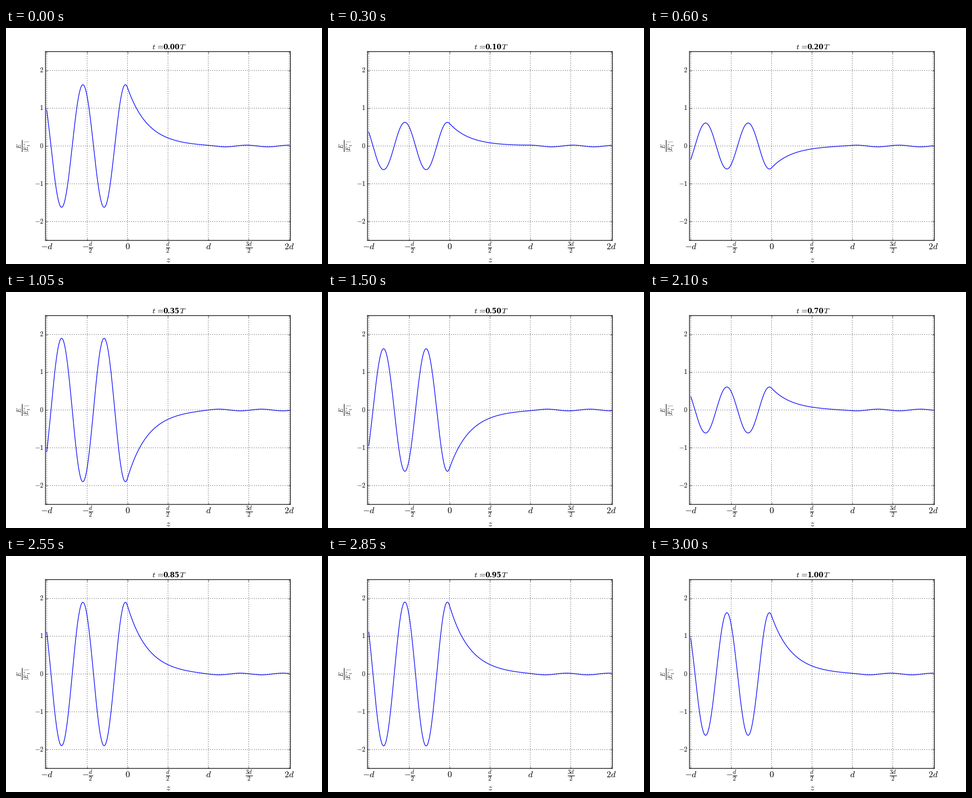
These frames come from a looping animation (576 px wide and 432 px high, 3150 ms). A matplotlib script:

```python
import numpy as np
import matplotlib.pyplot as plt
from matplotlib.animation import FuncAnimation

plt.style.use("classic")
plt.rcParams.update({
    "figure.facecolor": "white",
    "savefig.facecolor": "white",
    "savefig.dpi": "figure",
    "mathtext.fontset": "cm",
    "path.snap": False,
    "axes.linewidth": 1.2,
})

W, H, DPI = 576, 432, 72
FRAMES, INTERVAL = 21, 150

# Lengths are in units of the gap width d.
K = 2 * np.pi * 1.9      # wave number outside the gap
KAPPA = 0.33 * K         # decay constant inside the gap
PHASE = 0.2 * np.pi      # phase of the transmitted wave at z = d
MARGIN = 0.0156


def field(z):
    """Complex field of a wave tunnelling through the gap 0 < z < d."""
    out = np.exp(1j * PHASE)
    decay = out * (1 - 1j * K / KAPPA) / 2
    grow = out * (1 + 1j * K / KAPPA) / 2

    e0 = decay * np.exp(KAPPA) + grow * np.exp(-KAPPA)
    slope = KAPPA * (grow * np.exp(-KAPPA) - decay * np.exp(KAPPA))
    fwd = (e0 + slope / (1j * K)) / 2
    back = (e0 - slope / (1j * K)) / 2

    before = fwd * np.exp(1j * K * z) + back * np.exp(-1j * K * z)
    gap = decay * np.exp(-KAPPA * (z - 1)) + grow * np.exp(KAPPA * (z - 1))
    after = out * np.exp(1j * K * (z - 1))
    return np.where(z < 0, before, np.where(z < 1, gap, after)) / abs(fwd)


def put(x, y, text, size, ha="center", va="baseline", **kw):
    """Place text at pixel coordinates measured from the top left."""
    return fig.text(x / W, 1 - y / H, text, fontsize=size, ha=ha, va=va, **kw)


fig = plt.figure(figsize=(W / DPI, H / DPI), dpi=DPI)
ax = fig.add_axes([0.125, 0.1, 0.775, 0.8])
ax.set_xlim(-1 - MARGIN, 2 + MARGIN)
ax.set_ylim(-2.5, 2.5)

ax.set_xticks(np.arange(-1, 2.1, 0.5))
ax.set_xticklabels(
    [r"$-d$", r"$-\frac{d}{2}$", r"$0$", r"$\frac{d}{2}$", r"$d$",
     r"$\frac{3d}{2}$", r"$2d$"], fontsize=16)
ax.set_yticks(range(-2, 3))
ax.set_yticklabels([f"${v}$" for v in range(-2, 3)], fontsize=12)
ax.tick_params(axis="x", pad=16)
ax.tick_params(axis="y", pad=3.6)
for label in ax.get_xticklabels():
    label.set_verticalalignment("baseline")
ax.grid(True, color="black", linestyle=(0, (1.2, 2.8)), linewidth=0.75)

put(295.4, 429.1, r"$z$", 16)
put(33.8, 215.6, r"$\frac{E}{|E_1^{+}|}$", 14.4, va="center", rotation=90)

# Title: italic symbols around a bold running number.
put(266.2, 38.8, r"$t\hspace{0.11}=$", 14.4, ha="left")
clock = put(301.2, 38.8, "0.00", 12.2, family="DejaVu Serif", weight="bold")
put(315.9, 38.8, r"$T$", 14.4, ha="left")

z = np.linspace(-1, 2, 601)
wave = field(z)
line, = ax.plot(z, wave.real, color="blue", linewidth=1.2)


def update(i):
    t = i / (FRAMES - 1)
    line.set_ydata((wave * np.exp(-2j * np.pi * t)).real)
    clock.set_text(f"{t:.2f}")
    return line, clock


anim = FuncAnimation(fig, update, frames=FRAMES, interval=INTERVAL,
                     repeat=True, repeat_delay=0, blit=False)
plt.show()
```
